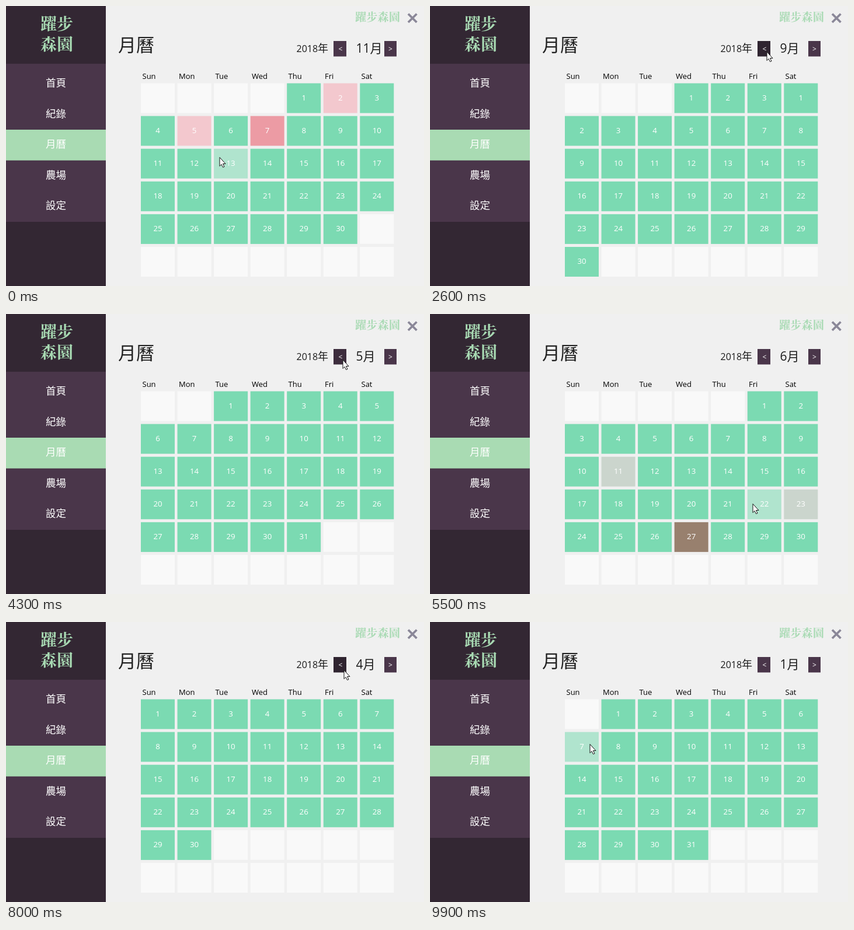
These frames come from a looping animation (716 by 480 pixels, 10 s). An HTML page:

```html
<!DOCTYPE html>
<html lang="zh-Hant">
<head>
<meta charset="utf-8">
<style>
html, body { margin: 0; width: 100%; height: 100%; overflow: hidden; background: #f0f0f0; }
svg { display: block; }
text { font-family: "Open Sans", "Noto Sans CJK TC", "Noto Sans CJK", sans-serif; }
.brand { font-family: "Noto Serif CJK TC", "Noto Sans CJK TC", "Noto Sans CJK", serif; font-weight: 700; fill: #a8dab3; }
.mid { text-anchor: middle; }
.white { fill: #fff; }
</style>
</head>
<body>
<svg id="stage" width="716" height="480" viewBox="0 0 716 480"></svg>
<script>
const LOOP = 10000, STEP = 100;
const GREEN = '#7bdab2', PINK = '#f3c8ce', GREY = '#cbd5cd';
const PLUM = [74, 54, 74], DARK = [47, 36, 48];
// Marked days, by month
const MARKS = {
  11: { 2: PINK, 5: PINK, 7: '#ec9ba4' },
  6: { 11: GREY, 23: GREY, 27: '#98806e' }
};

// Click times on each arrow
const BACK = [1500, 2200, 2700, 3300, 3700, 4200, 7500, 8000, 8500, 8900, 9500];
const NEXT = [5000];
// Cursor moves: start time, end time, and where it lands
const HOME = [366, 259];
const MOVES = [
  [0, 700, 436, 216], [700, 1300, 577, 78], [4600, 4900, 655, 76], [5100, 5500, 553, 325],
  [5500, 5900, 440, 372], [6000, 6600, 579, 82], [9700, 9900, 274, 209]
];

const clamp = v => Math.max(0, Math.min(1, v));
const rect = (x, y, w, h, fill, id = '') =>
  `<rect id="${id}" x="${x}" y="${y}" width="${w}" height="${h}" fill="${fill}"/>`;
const label = (x, y, size, str, cls = '', attrs = '') =>
  `<text x="${x}" y="${y}" font-size="${size}" class="${cls}" ${attrs}>${str}</text>`;

const W = 58, H = 51;
const cells = Array.from({ length: 42 }, (_, i) => ({
  x: 231 + 62.55 * (i % 7),
  y: 132.5 + 56.1 * Math.floor(i / 7)
}));

document.getElementById('stage').innerHTML =
  rect(0, 0, 171, 480, '#332733') + rect(0, 99, 171, 271, '#4a364a') +
  rect(0, 212, 171, 52.7, '#a9dbb3') +
  label(87, 41, 28, '躍步', 'brand mid') + label(87, 76, 28, '森園', 'brand mid') +
  ['首頁', '紀錄', '月曆', '農場', '設定'].map((s, i) =>
    label(85.5, 138 + 52.5 * i, 17.5, s, 'mid white')).join('') +
  label(598, 26, 19.25, '躍步森園', 'brand') +
  '<path d="M689 13.5l14.5 14.5m0 -14.5l-14.5 14.5" stroke="#8a8798" stroke-width="3.8"/>' +
  label(192, 78, 31, '月曆', '', 'font-weight="300" fill="#222"') +
  label(497.5, 79, 16, '2018<tspan font-size="18">年</tspan>', '', 'fill="#1c1c1c"') +
  label(599.5, 80, 21, '<tspan id="num"></tspan>月', '', 'fill="#1c1c1c"') +
  rect(561, 60, 22, 26.5, '', 'back') + label(573, 78, 12, '&lt;', 'mid white') +
  rect(648, 60, 21, 26.5, '', 'next') + label(658.5, 78, 12, '&gt;', 'mid white') +
  ['Sun', 'Mon', 'Tue', 'Wed', 'Thu', 'Fri', 'Sat'].map((s, i) =>
    label(233.5 + 62.5 * i, 125, 13, s)).join('') +
  cells.map((c, i) => rect(c.x, c.y, W, H, '', 'cell' + i) +
    label(c.x + W / 2, c.y + 29.3, 13.3, '', 'mid white', `id="day${i}"`)).join('') +
  '<path id="cursor" d="M0 0V15L3 12L5.5 17L8 16L5.5 11H10Z" fill="#fff" stroke="#111"/>';

const get = id => document.getElementById(id);
cells.forEach((c, i) => { c.box = get('cell' + i); c.text = get('day' + i); });
const back = get('back'), next = get('next'), num = get('num'), cursor = get('cursor');

function cursorAt(t) {
  let [x, y] = HOME;
  for (const [from, to, tx, ty] of MOVES) {
    const k = clamp((t - from) / (to - from)), ease = k * k * (3 - 2 * k);
    x += (tx - x) * ease;
    y += (ty - y) * ease;
  }
  return [x, y];
}

// Darkens just before each click and clears just after it
function buttonFill(clicks, t) {
  const k = Math.max(...clicks.map(c => clamp(1.5 - Math.abs(t - c + STEP) / (2 * STEP))));
  return `rgb(${PLUM.map((v, i) => Math.round(v + (DARK[i] - v) * k))})`;
}

function draw(t) {
  const count = clicks => clicks.filter(c => c <= t).length;
  const month = 11 - count(BACK) + count(NEXT);
  const first = new Date(2018, month - 1, 1).getDay();
  const length = new Date(2018, month, 0).getDate();
  const [mx, my] = cursorAt(t);

  cells.forEach((c, i) => {
    let day = i - first + 1;
    if (month === 9 && i >= 3 && i < 6) day = i - 2; // the app's stray days before September
    const live = day > 0 && day <= length;
    const hover = live && mx >= c.x && mx < c.x + W && my >= c.y && my < c.y + H;
    c.box.setAttribute('fill', live ? MARKS[month]?.[day] || GREEN : '#f9f9f9');
    c.box.setAttribute('opacity', hover ? 0.54 : 1);
    c.text.textContent = live ? day : '';
  });
  num.textContent = month;
  back.setAttribute('fill', buttonFill(BACK, t));
  next.setAttribute('fill', buttonFill(NEXT, t));
  cursor.setAttribute('transform', `translate(${Math.round(mx)} ${Math.round(my) + 0.5})`);
}

let start;
function tick(now) {
  start ??= now;
  draw(Math.floor((now - start) % LOOP / STEP) * STEP);
  requestAnimationFrame(tick);
}
draw(0);
requestAnimationFrame(tick);
</script>
</body>
</html>
```
